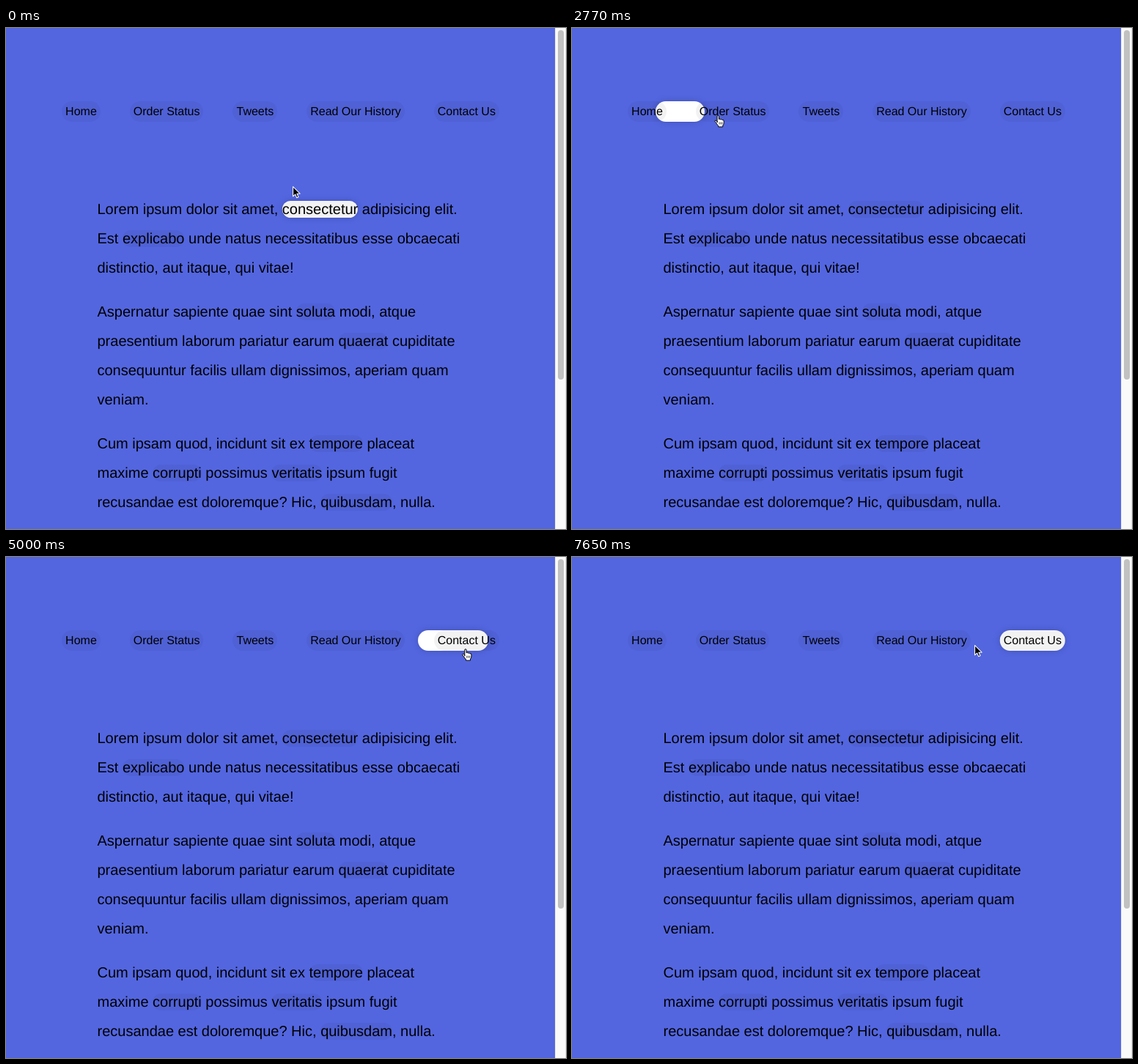
Animation, 764 px wide and 684 px high, one loop 8000 ms. Source, as an HTML page:

```html
<!DOCTYPE html>
<html lang="en">
<head>
<meta charset="utf-8">
<title>Follow-along links</title>
<style>
html, body { margin: 0; width: 100%; height: 100%; overflow: hidden; background: #5366e0; }
#stage {
  position: relative; width: 764px; height: 684px; overflow: hidden; isolation: isolate;
  background: #5366e0; color: #000;
  font: 20px/40px "Liberation Sans", Arial, sans-serif; text-rendering: geometricPrecision;
}
nav {
  position: absolute; left: 0; top: 100px; width: 749px;
  display: flex; justify-content: center; gap: 40px;
  font-size: 16px; line-height: 28px; white-space: nowrap;
}
a { background: rgba(0, 0, 0, .05); border-radius: 20px; }
nav a { box-sizing: border-box; height: 28px; padding: 1px 5px 0; }
p a { padding-top: 1px; }
main { position: absolute; left: 124.5px; top: 228px; white-space: nowrap; }
p { margin: 0 0 20px; }
#light {
  position: absolute; left: 0; top: 0; z-index: -1;
  background: #fff; border-radius: 20px; box-shadow: 0 0 10px rgba(0, 0, 0, .2);
}
#track {
  position: absolute; left: 749px; top: 0; width: 15px; height: 684px; box-sizing: border-box;
  background: #fafafa; border: solid #e8e8e8; border-width: 0 1px;
}
#track i {
  position: absolute; left: 3px; top: 3px; width: 8px; height: 477px;
  background: #c1c1c1; border-radius: 4px;
}
#cursor { position: absolute; left: 0; top: 0; overflow: visible; }
</style>
</head>
<body>
<div id="stage">
  <div id="light"></div>
  <nav>
    <a>Home</a>
    <a>Order Status</a>
    <a>Tweets</a>
    <a>Read Our History</a>
    <a>Contact Us</a>
  </nav>
  <main>
    <p>Lorem ipsum dolor sit amet, <a id="first">consectetur</a> adipisicing elit.<br>
      Est <a>explicabo</a> unde natus necessitatibus esse obcaecati<br>
      distinctio, aut itaque, qui vitae!</p>
    <p>Aspernatur sapiente quae sint <a>soluta</a> modi, atque<br>
      praesentium laborum pariatur earum <a>quaerat</a> cupiditate<br>
      consequuntur facilis ullam dignissimos, aperiam quam<br>
      veniam.</p>
    <p>Cum ipsam quod, incidunt sit ex <a>tempore</a> placeat<br>
      maxime <a>corrupti</a> possimus <a>veritatis</a> ipsum fugit<br>
      recusandae est doloremque? Hic, <a>quibusdam</a>, nulla.</p>
  </main>
  <div id="track"><i></i></div>
  <svg id="cursor" width="16" height="20">
    <path id="arrow" d="M.6 .6V14.6L3.8 11.6L6 16.6L8.4 15.6L6.2 10.7H10.6Z" transform="scale(.95)"
      fill="#000" stroke="#fff" stroke-width="1.1" stroke-linejoin="round"/>
    <g id="hand" transform="translate(-5 -1)" stroke="#000" stroke-linejoin="round">
      <path d="M3.8 10.2V2Q3.8 .7 4.9 .7T6.1 2V5.8Q7.8 4.9 8.4 6.2Q10 5.4 10.6 6.8Q12.8 6.2 12.9 8.2V11Q12.7 13 11.5 14.2V16.2H5.4V14.6Q3.6 13.2 2.4 10.8L.8 8.8Q.4 7.6 1.6 7.4Q2.6 7.4 3.8 9Z"
        fill="#fff" stroke-width="1"/>
      <path d="M6.7 9.8V12.8M8.7 9.8V12.8M10.6 9.8V12.8" fill="none" stroke-width=".7"/>
    </g>
  </svg>
</div>
<script>
const LOOP = 8000, GLIDE = 200, SIZE_LAG = 10, HAND_LAG = 20;
const $ = id => document.getElementById(id);

// Pointer strokes: start, end, and the point where the tip comes to rest.
const home = [391, 216];
const strokes = [
  [820, 990, 391, 291],
  [1520, 1800, 79, 98],
  [1890, 2070, 89, 48],
  [2310, 2460, 108, 126],
  [2660, 2940, 225, 118],
  [3340, 3600, 300, 126],
  [3624, 3660, 349, 124],
  [4230, 4500, 470, 118],
  [4821, 5000, 627, 126],
  [5090, 5460, 402, 111],
  [5660, 5840, 651, 87],
  [6104, 6110, 640, 102],
  [6110, 6230, 622, 114],
  [6245, 6510, 482, 95],
  [6700, 6710, 569, 95],
  [6950, 7050, 600, 112],
  [7050, 7270, 562, 121],
  [7400, 7650, 549, 120]
];

const mix = (a, b, k) => a + (b - a) * k;
const clamp = v => Math.min(1, Math.max(0, v));
const easeOut = k => 1 - (1 - k) ** 3;

// CSS "ease": cubic-bezier(.25, .1, .25, 1)
function ease(x) {
  const curve = (s, a, b) => 3 * (1 - s) ** 2 * s * a + 3 * (1 - s) * s * s * b + s ** 3;
  let lo = 0, hi = 1;
  for (let i = 0; i < 24; i++) {
    const mid = (lo + hi) / 2;
    if (curve(mid, .25, .25) < x) lo = mid; else hi = mid;
  }
  return curve(lo, .1, 1);
}

function pointer(t) {
  return strokes.reduce(([x, y], [start, end, toX, toY]) => {
    const k = easeOut(clamp((t - start) / (end - start)));
    return [mix(x, toX, k), mix(y, toY, k)];
  }, home);
}

const inside = ([x, y], r, pad = 0) =>
  x > r.left - pad && x < r.right + pad && y > r.top - pad && y < r.bottom + pad;

// Each link the pointer enters becomes the highlight's next stop.
const boxes = [...document.querySelectorAll("a")].map(a => a.getBoundingClientRect());
const stops = [{ start: -GLIDE, box: $("first").getBoundingClientRect() }];
for (let t = 0; t < LOOP; t++) {
  const box = boxes.find(b => inside(pointer(t), b));
  const last = stops.at(-1).box;
  if (box && (box.left !== last.left || box.top !== last.top)) stops.push({ start: t, box });
}

function draw(t) {
  const i = stops.findLastIndex(s => s.start <= t);
  const { start, box: to } = stops[i], from = stops[Math.max(0, i - 1)].box;
  const age = t - start;
  const go = ease(clamp(age / GLIDE)), grow = ease(clamp((age - SIZE_LAG) / GLIDE));
  const light = $("light").style;
  light.transform = `translate(${mix(from.left, to.left, go)}px, ${mix(from.top, to.top, go)}px)`;
  light.width = mix(from.width, to.width, grow) + "px";
  light.height = mix(from.height, to.height, grow) + "px";

  const tip = pointer(t);
  const over = age > HAND_LAG && inside(tip, to, 3);
  $("cursor").style.transform = `translate(${tip[0]}px, ${tip[1]}px)`;
  $("hand").style.display = over ? "" : "none";
  $("arrow").style.display = over ? "none" : "";
}

const begin = performance.now();
function loop() {
  draw((performance.now() - begin) % LOOP);
  requestAnimationFrame(loop);
}
loop();
</script>
</body>
</html>
```
